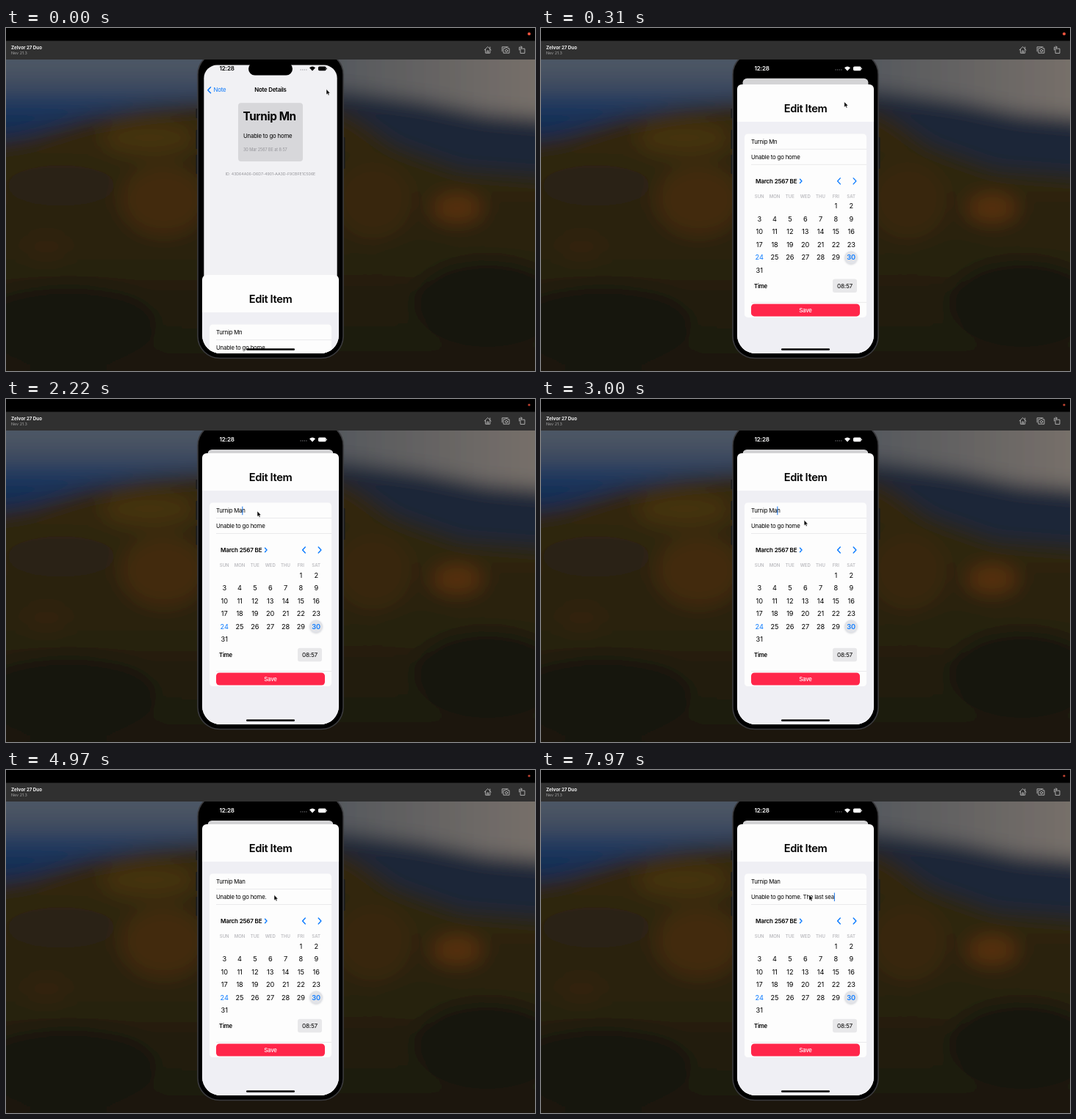
Animation, 720 px wide and 468 px high, one loop 8000 ms. Source, as an HTML page:

```html
<!DOCTYPE html>
<html lang="en">
<head>
<meta charset="utf-8">
<title>Edit item</title>
<style>
  html, body { margin: 0; width: 100%; height: 100%; overflow: hidden; background: #000; }
  svg { display: block; width: 100vw; height: 100vh; }
  text { font: 7.8px Inter, sans-serif; letter-spacing: -.025em; white-space: pre; fill: #000; }
  .semi { font-weight: 600; }
  .mid { text-anchor: middle; }
  text.blue { fill: #0a7aff; }
  text.heading { font-size: 14.7px; font-weight: 600; }
  text.title { font-size: 15.3px; font-weight: 700; }
  text.small { font-size: 5.5px; fill: #97979c; letter-spacing: -.01em; }
  text.weekday { font-size: 6px; font-weight: 600; fill: #bdbdc1; letter-spacing: 0; }
  text.day { font-size: 9.2px; letter-spacing: -.01em; }
  .line { fill: none; stroke-linecap: round; stroke-linejoin: round; }
  .chevron { stroke: #0a7aff; stroke-width: 1.4; }
  .icon { stroke: #b9b9b9; stroke-width: .9; }
  .rule { stroke: #dedee1; stroke-width: .6; }
</style>
</head>
<body>
<svg viewBox="0 0 720 468" xmlns="http://www.w3.org/2000/svg">
  <defs>
    <linearGradient id="sky" x2="0" y2="1">
      <stop stop-color="#555e69"/>
      <stop offset=".3" stop-color="#434e60"/>
      <stop offset=".5" stop-color="#19345d"/>
      <stop offset="1" stop-color="#0d1d38"/>
    </linearGradient>
    <linearGradient id="dusk">
      <stop stop-color="#4b5159"/>
      <stop offset="1" stop-color="#80766d"/>
    </linearGradient>
    <linearGradient id="hill" x2="0" y2="1">
      <stop stop-color="#33290f"/>
      <stop offset=".45" stop-color="#2a2211"/>
      <stop offset="1" stop-color="#121310"/>
    </linearGradient>
    <filter id="blur" filterUnits="userSpaceOnUse" x="-80" y="-40" width="880" height="590"><feGaussianBlur stdDeviation="13"/></filter>
    <filter id="glow" x="-50%" y="-50%" width="200%" height="200%"><feGaussianBlur stdDeviation="1.2"/></filter>
    <clipPath id="screen"><rect x="267" y="41" width="186" height="403" rx="25"/></clipPath>
    <clipPath id="stage"><rect y="43" width="720" height="425"/></clipPath>
  </defs>

  <g clip-path="url(#stage)">
    <g filter="url(#blur)">
      <rect x="-80" y="-40" width="880" height="590" fill="#15150f"/>
      <rect x="-80" y="20" width="440" height="180" fill="url(#sky)"/>
      <rect x="360" y="-40" width="440" height="190" fill="url(#dusk)"/>
      <path d="M360 76L480 88L570 100L650 116L800 128V240H360z" fill="#1b2838"/>
      <path d="M-80 166L30 148L110 122L190 107L360 92V550H-80z" fill="url(#hill)"/>
      <path d="M360 80L470 118L530 160L620 192L800 206V550H360z" fill="url(#hill)"/>
      <ellipse cx="195" cy="150" rx="65" ry="24" fill="#45330f"/>
      <ellipse cx="215" cy="235" rx="58" ry="48" fill="#432a10"/>
      <ellipse cx="75" cy="215" rx="75" ry="28" fill="#292312"/>
      <ellipse cx="55" cy="300" rx="34" ry="20" fill="#30200f"/>
      <ellipse cx="85" cy="405" rx="120" ry="55" fill="#181810"/>
      <ellipse cx="500" cy="235" rx="52" ry="52" fill="#38270f"/>
      <ellipse cx="614" cy="246" rx="34" ry="18" fill="#59330f"/>
      <ellipse cx="560" cy="315" rx="60" ry="26" fill="#272010"/>
      <ellipse cx="655" cy="375" rx="100" ry="60" fill="#151510"/>
    </g>

    <g fill="#1b1b1c">
      <rect x="258.5" y="110" width="3" height="13" rx="1"/>
      <rect x="258.5" y="139" width="3" height="26" rx="1"/>
      <rect x="258.5" y="173" width="3" height="26" rx="1"/>
      <rect x="458.5" y="149" width="3" height="43" rx="1"/>
    </g>
    <rect x="261" y="33.5" width="198" height="417" rx="30" fill="#000" stroke="#3a3a3d" stroke-width="1.6"/>
  </g>

  <g clip-path="url(#stage)"><g clip-path="url(#screen)">
    <g id="page">
      <rect id="paper" x="269.3" y="50.4" width="181.4" height="400" fill="#f5f5f8"/>
      <path class="line chevron" d="M278.5 80.5L274.7 84.5L278.5 88.5" stroke-width="1.2"/>
      <text class="blue" x="282.5" y="87.2">Note</text>
      <text class="semi mid" x="360" y="87.2">Note Details</text>
      <rect x="316" y="102" width="88" height="80" rx="4" fill="#dadadd"/>
      <text class="title" x="322.5" y="126.3">Turnip Mn</text>
      <text x="323" y="149.6">Unable to go home</text>
      <text class="small" x="323" y="168">30 Mar 2567 BE at 8:57</text>
      <text class="small mid" x="360" y="201.4" style="font-size:5.3px">ID: 43D64A06-D6D7-4901-AA3D-F9CBFE1C506E</text>
      <rect id="dim" x="269.3" y="50.4" width="181.4" height="400"/>
    </g>

    <rect x="330" y="47" width="60" height="17.5" rx="8.75"/>
    <g id="status">
      <text class="semi" x="290.5" y="58.4" style="fill:inherit;font-size:8.1px">12:28</text>
      <path d="M400.5 57h1.2m1.4 0h1.2m1.4 0h1.2m1.4 0h1.2" stroke="#88888c" stroke-width="1.1"/>
      <path d="M417 58.6L413 54.2Q417 50.8 421 54.2z"/>
      <rect x="425" y="52.6" width="10.6" height="5.6" rx="1.6"/>
      <rect x="436.2" y="54.4" width=".8" height="2" rx=".4"/>
    </g>

    <!-- Drawn at its resting position -->
    <g id="sheet">
      <rect x="267" y="74" width="186" height="400" rx="6" fill="#fdfdfd"/>
      <rect x="267" y="125" width="186" height="350" fill="#efeff4"/>
      <text class="heading mid" x="360" y="112">Edit Item</text>
      <rect x="277" y="141.5" width="166" height="250.5" rx="4.5" fill="#fdfdfd"/>
      <path class="rule" d="M286 162.5H443M286 183.5H443M286 371.5H443"/>
      <text id="row0" x="286" y="155.2"></text>
      <text id="row1" x="286" y="176.1"></text>
      <rect id="caret" width="1.1" height="11.6" fill="#2b7fea"/>
      <text class="semi" x="292" y="208.9" style="font-size:8.1px">March 2567 BE</text>
      <path class="line chevron" d="M352.5 203.3L355 206L352.5 208.7" stroke-width="1.1"/>
      <path class="line chevron" d="M407.3 202L403.6 206L407.3 210M425.2 202L428.9 206L425.2 210"/>
      <circle cx="422" cy="311" r="9" fill="#b9bcc4" opacity=".6" filter="url(#glow)"/>
      <circle cx="422" cy="310.2" r="8.6" fill="#e1e3e8"/>
      <g id="calendar"></g>
      <text class="semi" x="290" y="352">Time</text>
      <rect x="397" y="339.7" width="33" height="18.5" rx="3" fill="#e8e8ea"/>
      <text class="mid" x="413.5" y="352" style="font-size:8.2px">08:57</text>
      <rect x="286" y="373.5" width="148" height="17" rx="4.5" fill="#ff264a"/>
      <text class="mid" x="360" y="384.9" style="fill:#fff;font-weight:500">Save</text>
    </g>
    <rect x="327" y="437.3" width="66" height="2.4" rx="1.2"/>
  </g></g>

  <rect width="720" height="18"/>
  <rect y="17.5" width="720" height="25.5" fill="#303030"/>
  <text x="7" y="29.4" style="font-size:6.2px;font-weight:700;fill:#f4f4f4;letter-spacing:0">Zelvor 27 Duo</text>
  <text x="7" y="36.4" style="font-size:5.4px;fill:#a3a3a3;letter-spacing:0">Nev 21.3</text>
  <g class="line icon">
    <path d="M651.2 30L655.7 25.6L660.2 30M652.6 29.2V34.2H658.8V29.2M654.8 34V31H656.6V34M658.8 26V28"/>
    <path d="M675.2 31.8V25.8H683.2M677.4 27.8H679.2L680 26.8H682.2L683 27.8H685V34.2H677.4z"/>
    <circle cx="681.2" cy="31" r="1.6"/>
    <path d="M700.5 28.2H706V34.4H700.5zM698.6 30V26.2H702.2M700.9 24.8L702.4 26.2L700.9 27.6"/>
  </g>
  <circle id="dot" cx="712" cy="8" fill="#f0543f"/>
  <path id="cursor" d="M0 0V7.4L1.7 5.9L2.8 8.4L4.1 7.8L3 5.4H5.2z" fill="#000" stroke="#fff" stroke-width=".5"/>
</svg>

<script>
const LOOP = 8000;
const el = id => document.getElementById(id);
const [page, paper, dim, status, sheet, caret, dot, cursor] =
  ['page', 'paper', 'dim', 'status', 'sheet', 'caret', 'dot', 'cursor'].map(el);
const rows = [el('row0'), el('row1')];

function addText(label, x, y, className) {
  const node = document.createElementNS('http://www.w3.org/2000/svg', 'text');
  node.setAttribute('x', x);
  node.setAttribute('y', y);
  node.setAttribute('class', 'mid ' + className);
  node.textContent = label;
  el('calendar').append(node);
  return node;
}

const columnX = column => 297.2 + column * 20.83;
['SUN', 'MON', 'TUE', 'WED', 'THU', 'FRI', 'SAT']
  .forEach((name, i) => addText(name, columnX(i), 229, 'weekday'));
for (let day = 1; day <= 31; day++) {
  const cell = day + 4;
  const y = 243.6 + Math.floor(cell / 7) * 17.5;
  const mark = day === 24 ? ' blue' : day === 30 ? ' blue semi' : '';
  addText(day, columnX(cell % 7), y, 'day' + mark);
}

// Each edit: time, focused row, text before the caret, text after it
const BODY = 'Unable to go home';
const TYPED = '. The last sea';
const keyTimes = [4350, 5200, 5450, 5600, 5750, 5900, 6100, 6300, 6560, 6760, 6960, 7200, 7460, 7760];
const edits = [
  [0, -1, '', ''],
  [1200, 0, 'Turnip Mn', ''],
  [1620, 0, 'Turnip M', 'n'],
  [2000, 0, 'Turnip Ma', 'n'],
  [3350, 1, BODY, ''],
  ...keyTimes.map((time, i) => [time, 1, BODY + TYPED.slice(0, i + 1), '']),
];

const mix = (a, b, k) => a + (b - a) * k;
function ease(t, start, end) {
  const k = Math.min(1, Math.max(0, (t - start) / (end - start)));
  return k * k * (3 - 2 * k);
}

// Critically damped spring, already under way at the start of the loop
function springLeft(t) {
  const phase = 1.2 + 18.7 * t / 1000;
  return (1 + phase) * Math.exp(-phase);
}
const pageScale = risen => 1 - .086 * risen;
const pageTop = risen => 41 + 28 * risen;
const firstRisen = 1 - springLeft(0);

function drawSheet(t) {
  const left = springLeft(t);
  const risen = 1 - left;
  const scale = pageScale(risen) / pageScale(firstRisen);
  sheet.setAttribute('transform', `translate(0 ${401 * left})`);
  page.setAttribute('transform',
    `translate(360 ${pageTop(risen)}) scale(${scale}) translate(-360 ${-pageTop(firstRisen)})`);
  for (const box of [paper, dim]) box.setAttribute('rx', mix(24, 6, risen));
  dim.setAttribute('opacity', .14 * risen * risen);
  status.setAttribute('fill', risen > .6 ? '#fff' : '#000');
}

function drawFields(t) {
  const [time, row, before, after] = edits.findLast(edit => edit[0] <= t);
  rows[0].textContent = t < 2000 ? 'Turnip Mn' : 'Turnip Man';
  rows[1].textContent = BODY;
  const visible = row >= 0 && (t - time) % 1000 < 500;
  caret.setAttribute('visibility', visible ? 'visible' : 'hidden');
  if (row < 0) return;
  rows[row].textContent = before;
  caret.setAttribute('x', 286 + rows[row].getComputedTextLength());
  caret.setAttribute('y', 146.6 + 20.9 * row);
  rows[row].textContent = before + after;
}

function drawPointer(t) {
  const toTitle = ease(t, 0, 960);
  const toBody = ease(t, 2650, 3200);
  const x = mix(mix(436, 342, toTitle), 365, toBody);
  const y = mix(mix(83.5, 153, toTitle), 170.5, toBody);
  cursor.setAttribute('transform', `translate(${x} ${y})`);
  const fade = ease(t, 900, 1600);
  dot.setAttribute('r', mix(2.1, 1.6, fade));
  dot.setAttribute('opacity', mix(1, .8, fade));
}

const start = performance.now();
function render() {
  const t = (performance.now() - start) % LOOP;
  drawSheet(t);
  drawFields(t);
  drawPointer(t);
  requestAnimationFrame(render);
}
render();
</script>
</body>
</html>
```
